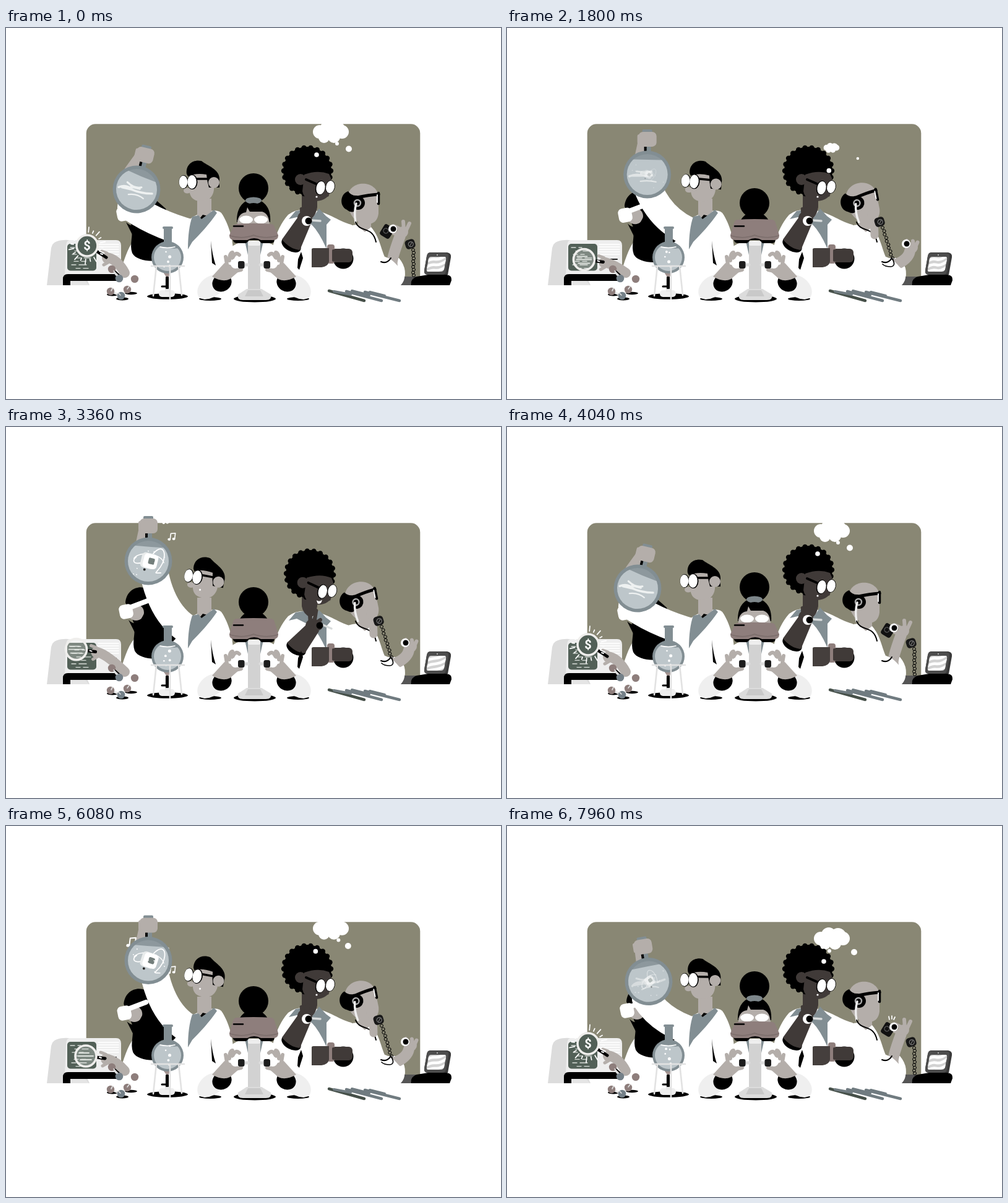
Recreate the animation shown at these times as an HTML page with a canvas. Size 800 px wide and 600 px high, loop 8 s.

```html
<!DOCTYPE html>
<html lang="en">
<head>
<meta charset="utf-8">
<title>Laboratory</title>
<style>
html, body { margin: 0; width: 100%; height: 100%; overflow: hidden; background: #fff; }
canvas { display: block; width: 800px; height: 600px; }
</style>
</head>
<body>
<canvas id="stage" width="800" height="600"></canvas>
<script>
const ctx = document.getElementById('stage').getContext('2d');
const LOOP = 8000, CYCLE = 4040, HALF = 2020, TAU = Math.PI * 2;
const WHITE = '#fff', BLACK = '#000', SKIN = '#b4aeaa', DARK = '#403a38',
  STEEL = '#828e93', PALE = '#bdc6ca', MAUVE = '#8e7e7c', WALL = '#898774', SCREEN = '#526057';

const mix = (a, b, u) => a + (b - a) * u;
const ease = u => u * u * (3 - 2 * u);

// Eased value between [time, value] stops.
function key(t, ...stops) {
  if (t <= stops[0][0]) return stops[0][1];
  for (let i = 1; i < stops.length; i++) {
    const [t0, a] = stops[i - 1], [t1, b] = stops[i];
    if (t <= t1) return mix(a, b, ease((t - t0) / (t1 - t0)));
  }
  return stops[stops.length - 1][1];
}

function shape(d, color) {
  ctx.fillStyle = color;
  ctx.fill(new Path2D(d));
}
function line(d, color, width) {
  ctx.strokeStyle = color;
  ctx.lineWidth = width;
  ctx.stroke(new Path2D(d));
}
function oval(x, y, rx, ry, color, turn = 0) {
  ctx.fillStyle = color;
  ctx.beginPath();
  ctx.ellipse(x, y, Math.max(rx, 0), Math.max(ry, 0), turn, 0, TAU);
  ctx.fill();
}
const dot = (x, y, r, color) => oval(x, y, r, r, color);
function ring(x, y, r, color, width) {
  ctx.strokeStyle = color;
  ctx.lineWidth = width;
  ctx.beginPath();
  ctx.arc(x, y, r, 0, TAU);
  ctx.stroke();
}
function box(x, y, w, h, r, color) {
  ctx.fillStyle = color;
  ctx.beginPath();
  ctx.roundRect(x, y, w, h, r);
  ctx.fill();
}
// Draw in a local frame whose origin is placed at x, y.
function at(x, y, turn, draw, sx = 1, sy = sx) {
  ctx.save();
  ctx.translate(x, y);
  ctx.rotate(turn);
  ctx.scale(sx, sy);
  draw();
  ctx.restore();
}
// Turn about a pivot while keeping stage coordinates.
function pose(px, py, turn, dx, dy, draw) {
  at(px + dx, py + dy, turn, () => { ctx.translate(-px, -py); draw(); });
}

function thought(p) {
  const q = p < 400 ? p + HALF : p;
  if (q < 1740 || q > 2320) return;
  const u = (q - 1900) / 120, grow = key(q, [1740, 0], [1870, 1]);
  ctx.save();
  ctx.beginPath();
  ctx.rect(130, 100, 539, 200);
  ctx.clip();
  at(524, 182 - 14 * u, 0, () => {
    for (const [x, y, r] of [[-17, 0, 11], [-4, -6, 12], [11, -4, 13], [19, 0, 11], [6, 8, 10], [-10, 9, 9]])
      dot(x, y, r, WHITE);
  }, grow);
  dot(561 - 7 * u, 204 - 8.5 * u, 5 * grow, WHITE);
  dot(521 + 14 * Math.min(u, 1.3), 202 - 15 * u, 3 * grow, WHITE);
  ctx.restore();
}
function thoughtSpark(p) {
  const q = p < 400 ? p + HALF : p;
  if (q < 1780 || q > 2160) return;
  const u = (q - 1900) / 120;
  dot(512 - 10 * u, 219 - 14 * u, 3.8, WHITE);
}

function seeker(t) {
  const dx = key(t, [0, -4], [1080, -4], [1900, -3], [2640, 0], [3920, 0], [4040, -4]);
  const dy = key(t, [0, 2], [1080, 6], [2040, 4], [2640, 0], [3920, 0], [4040, 2]);
  shape('M207 343 C196 356 190 378 183 400 L183 416 H300 V340Z', WHITE);
  pose(215, 320, 0, dx, dy, () => {
    shape('M193 284 C195 258 223 252 237 268 L262 290 280 335 256 373 C238 377 214 374 208 362 C203 348 210 334 207 318Z', BLACK);
    dot(210, 300, 13, SKIN);
    shape('M198 312 Q212 326 222 304 L230 290 240 330 210 336Z', BLACK);
    line('M200 292 L229 281', WHITE, 8);
    pose(194, 298, -.2, 0, 0, () => box(183, 287, 22, 23, 7, WHITE));
  });
}

function machine() {
  shape('M80 346 Q89 342 102 343 L135 416 H66 L73 356 Q75 348 80 346Z', '#dcdcdc');
  shape('M103 343 H178 Q186 343 186 352 V400 H95 L97 352 Q98 343 103 343Z', '#eeeeee');
  for (let y = 350; y < 370; y += 4) line(`M149 ${y} H182`, WHITE, 1.6);
  shape('M92 416 V406 Q92 398 100 398 H180 V409 H104 V416Z', BLACK);
  shape('M104 409 H128 L134 416 H104Z', '#e5e5e5');
  line('M160 374 H178', '#222', 2);
  ctx.save();
  ctx.beginPath();
  ctx.roundRect(99, 349, 47, 43.5, 5);
  ctx.clip();
  ctx.fillStyle = SCREEN;
  ctx.fillRect(99, 349, 47, 44);
  for (let i = 0; i < 7; i++) {
    const y = 355 + i * 5.6, x = 104 + (i * 7) % 11, w = 7 + (i * 13) % 13;
    line(`M${x} ${y} h${w} m5 0 h${5 + (i * 5) % 9}`, '#d7dcd8', 1.3);
  }
  ctx.restore();
}

function magnifier(t, d) {
  const x = key(t, [0, 131], [620, 131], [1080, 120], [1500, 118], [2040, 129], [2640, 106], [3200, 108], [3700, 131]);
  const y = key(t, [0, 352], [620, 352], [1080, 381], [1500, 378], [2040, 372], [2640, 357], [3200, 362], [3700, 352]);
  const found = key(t, [0, 1], [550, 1], [750, 0], [3500, 0], [3700, 1]);
  const hx = x + 36, hy = y + mix(20, 5, d);
  line(`M${hx} ${hy} Q${hx + 14} ${hy + 4} 192 396`, SKIN, 16);
  dot(hx - 3, hy, 9, SKIN);
  line(`M${hx - 4} ${hy - 8} l-8 -3 M${hx - 2} ${hy + 7} l-7 4`, SKIN, 5);
  line(`M${x + 17} ${y + mix(10, 2, d)} L${hx - 5} ${hy - 1}`, BLACK, 5);
  line(`M${x + 22} ${y + mix(13, 2, d)} l3 1`, WHITE, 2);
  line('M174 391 L186 402', BLACK, 2);
  if (found > 0) {
    ctx.globalAlpha = found;
    dot(x, y, 16, SCREEN);
    for (let i = 0; i < 20; i++) {
      const a = i / 20 * TAU + .1, c = Math.cos(a), s = Math.sin(a);
      const far = 26 + 4 * (i % 2) + Math.sin(t / 60) * 1.2;
      line(`M${x + c * 22} ${y + s * 22} L${x + c * far} ${y + s * far}`, WHITE, 1.7);
    }
    ctx.fillStyle = WHITE;
    ctx.font = 'bold 20px Roboto, "Liberation Sans", sans-serif';
    ctx.textAlign = 'center';
    ctx.textBaseline = 'middle';
    ctx.fillText('$', x, y + 1);
    ctx.globalAlpha = 1;
  } else {
    ctx.globalAlpha = .25;
    dot(x, y, 16, WHITE);
    ctx.globalAlpha = 1;
    line(`M${x - 11} ${y - 5} h16 M${x - 12} ${y} h24 M${x - 9} ${y + 6} h18`, '#dfe3df', 1.8);
  }
  ring(x, y, 17, '#efeeec', 3.6);
}

function note(x, y, s) {
  at(x, y, .12, () => {
    line('M-4 6 V-6 L5 -8 V4', WHITE, 2);
    oval(-6, 6, 3, 2.4, WHITE);
    oval(3, 4, 3, 2.4, WHITE);
  }, s);
}

function player() {
  line('M-20 -8 C-34 2 -12 10 6 -10 S30 -12 22 4 S2 20 18 20', WHITE, 1.7);
  line('M-24 -6 C-14 -18 20 -12 24 4', WHITE, 1.4);
  at(0, 0, .3, () => {
    box(-13, -13, 24, 25, 6, '#e9ecec');
    box(-9, -12, 23, 23, 5, WHITE);
    box(-1, -6, 10, 10, 2, '#737e7b');
  });
  dot(-8, 13, 2, '#222');
}

function bigFlask(t) {
  const time = t > 2000 ? t - CYCLE : t;
  const env = key(t, [0, 1], [600, 1], [1000, 0], [3600, 0], [3850, 1]);
  const wave = Math.cos(time / 320 * TAU) * env;
  const x = key(t, [0, 221.5], [1600, 222], [1960, 230], [3600, 230], [3900, 221.5]) - 10.5 * wave;
  const y = key(t, [0, 261], [1000, 264], [1600, 264], [1960, 217.5], [3640, 217], [4040, 261]);
  const tilt = .23 * wave;
  const lift = key(t, [1600, 0], [1960, 1], [3640, 1], [4040, 0]);
  const made = key(t, [1700, 0], [1980, 1], [3800, 1], [4030, 0]);

  line(`M320 338 Q${mix(250, 258, lift)} 322 ${x + mix(-8, 10, lift)} ${y + mix(29, 22, lift)}`, WHITE, 46);
  const hx = x + 58 * Math.sin(tilt), hy = y - 58 * Math.cos(tilt);
  line(`M${hx - 6} ${hy} L${x - 12} ${y - 30}`, SKIN, 16);

  if (made > .6 && t < 3640) {
    const rise = (t - 2040) * .042;
    if (rise < 60) note(204, 188 - rise, 1);
    note(259, 202 - rise * .9, .65);
    note(269, 233 - rise, .8);
  }

  at(x, y, tilt, () => {
    box(-5, -50, 11, 22, 1, STEEL);
    box(-5, -46, 4, 8, 0, BLACK);
    box(-8, -73, 16, 6, 2, STEEL);
    box(-14, -69, 29, 24, 7, SKIN);
    line('M-13 -62 v10', SKIN, 6);
    dot(0, 0, 38.5, STEEL);
    ctx.beginPath();
    ctx.arc(0, 0, 33, 0, TAU);
    ctx.clip();
    ctx.fillStyle = '#8d989d';
    ctx.fillRect(-40, -40, 80, 80);
    const lean = mix(7 * wave, 3, made);
    shape(`M-40 ${-24 - lean} Q0 ${-24 + lean * .4} 40 ${-24 + lean} V40 H-40Z`, PALE);
    ctx.globalAlpha = 1 - made;
    const sway = Math.sin(time / 110) * 2 * env, bend = 3 * env;
    line(`M${-17 + sway} ${-5 - bend} Q-4 ${-3 + bend} 7 -5 M-10 -2 H5`, '#eef1f1', 3);
    line(`M${-29 - sway} 3 Q-18 ${-2 - bend} -6 2 H-24 M-8 2 Q10 ${2 + bend} ${8 + 18 * env} 1`, '#eef1f1', 3.4);
    line(`M${-11 + sway} 11 Q2 ${9 - bend} 14 12`, '#eef1f1', 2.2);
    ctx.globalAlpha = made;
    if (made > 0) at(1, 0, Math.sin(time / 90) * .06 + wave, player, .3 + .7 * made);
    for (let i = 0; i < 7; i++) dot(Math.sin(i * 5.1) * 26, 24 - (t * .012 + i * 9) % 46, .9, WHITE);
    ctx.globalAlpha = 1;
  });
}

function chemistBody() {
  shape('M296 311 Q303 302 326 297 Q345 292 350 302 C362 322 367 346 367 360 V416 H240 V368 Q276 350 296 311Z', WHITE);
  shape('M309 276 H332 V297 L318 309 309 306Z', SKIN);
  shape('M309 313 L318 302 326 304 316 318Z', BLACK);
  shape('M301 305 L311 303 316 309 336 294 341 299 C328 318 313 334 301 346 L294 358 Q294 325 301 305Z', STEEL);
  shape('M331 344 Q333 366 339 384 L333 380Z', BLACK);
}
function chemistHead(t) {
  const turn = key(t, [0, 0], [700, 0], [1000, -.05], [1600, -.05], [1960, .19], [3600, .19], [3960, 0]);
  const dx = key(t, [0, 0], [700, 0], [1000, -6], [1600, -6], [1960, 5.5], [3600, 5.5], [3960, 0]);
  const dy = key(t, [0, 0], [700, 0], [1000, 6], [1600, 6], [1960, -2.5], [3600, -2.5], [3960, 0]);
  pose(320, 262, turn, dx, dy, () => {
    shape('M296 236 H336 V262 C334 276 324 281 313 280 C300 279 296 270 296 258Z', SKIN);
    oval(293, 263, 6, 4.5, SKIN);
    shape('M292 236 C290 221 302 212 316 215 C326 223 344 228 345 243 V258 H328 Q325 248 324 237 Q306 234 294 240Z', BLACK);
    dot(336, 250, 9, SKIN);
    line('M306 244 H327', BLACK, 3.5);
    oval(287, 249, 7.5, 11, BLACK);
    oval(301, 249, 8.5, 12, BLACK);
    oval(286.5, 249, 6.8, 10.3, WHITE);
    oval(300.5, 249, 7.3, 11, WHITE);
    if (turn > .1) dot(309, 268, 1.5, WHITE);
  });
}

function caller(t, d) {
  const dip = key(t, [850, 0], [1080, 7], [1350, 0]);
  shape('M550 322 Q570 314 590 322 C604 338 606 358 613 372 H635 Q652 392 640 416 H520 V318Z', WHITE);
  ctx.fillStyle = '#555';
  ctx.fillRect(638, 402, 31, 14);
  shape('M570 308 H590 V322 L580 330 568 320Z', SKIN);
  const hx = mix(641, 655, d), hy = mix(330, 355, d), reach = 1 - .5 * d;
  line(`M624 384 Q${mix(622, 648, d)} 376 ${hx - 4} ${hy + 6}`, SKIN, 18);
  shape('M583 376 Q612 358 634 386 Q652 400 638 416 H560Z', WHITE);
  line('M606 378 Q616 382 622 372', BLACK, 2);
  pose(574, 281, -.2 * d, -3 * d, dip * d - d, () => {
    shape('M552 274 C554 244 600 245 602 273 V300 Q600 317 584 317 Q564 317 556 298Z', SKIN);
    shape('M553 264 C540 268 538 288 551 294 Q558 300 564 296 L568 271 Q558 272 553 264Z', BLACK);
    line('M568 274 Q586 270 602 269', BLACK, 5);
    line('M602 267 V284', BLACK, 4.5);
    line('M600 270 V282', WHITE, 1.8);
    dot(569, 283, 11, BLACK);
    ring(568, 283, 5, '#aaa', 2.5);
    line('M566 284 Q562 298 565 314', '#eee', 3.5);
  });
  line(`M565 ${314 + dip * .5} C572 332 592 319 598 346`, BLACK, 2);

  const px = mix(653, 602, d), py = mix(349, 313, d);
  const ex = mix(658, 622, d), ey = mix(400, 372, d);
  for (let i = 0; i <= 9; i++) {
    const u = i / 9;
    ring(mix(px + 5, ex, u) + (i % 2), mix(py + 10, ey, u), 2.5, BLACK, 1);
  }
  if (d > .5) line(`M${ex} ${ey} Q630 385 620 386 Q611 386 607 382`, BLACK, 1.7);
  if (d > .3) {
    line(`M${px - 8} ${py + 22} L${px - 9} ${py - 8}`, SKIN, 13);
    dot(px - 11, py - 10, 9, SKIN);
  }
  at(px, py, -.3, () => {
    box(-8, -7, 16, 15, 5, '#181818');
    ring(1, 1, 4, '#777', 1.2);
    line('M-1 3 L3 -1', '#777', 1.2);
  });

  const ox = mix(625, 645, d), oy = mix(325, 349, d);
  const snap = 1 - key(d, [0, 0], [.6, 1]);
  if (snap > 0) at(614, 328, .55, () => {
    box(-7, -10, 18, 20, 4, '#111');
    ring(0, 0, 4, '#555', 1.4);
  }, snap);
  dot(hx, hy, 9, SKIN);
  line(`M${hx - 4} ${hy - 5} L${ox + 1} ${oy - 5} M${hx - 6} ${hy + 4} L${ox + 2} ${oy + 7}`, SKIN, 6);
  line(`M${hx + 2} ${hy - 4} l-1 ${-13 * reach} M${hx + 6} ${hy - 3} l${5 * reach} ${-11 * reach}`, SKIN, 6);
  dot(ox, oy, 7, WHITE);
  dot(ox + 1, oy, 4.5, BLACK);
  if (t > 3840 && t < 4000) line('M617 308 l1 5 M622 307 v5 M627 309 l-2 4', WHITE, 1.7);
}

function artist(p) {
  const nod = key(p, [250, 0], [1000, 1], [1350, 1], [1740, 0]);
  const q = key(p, [150, 0], [500, 1], [1400, 1], [1740, 0]);
  at(0, 4 * nod, 0, () => {
    shape('M456 302 Q468 292 490 294 C520 296 535 312 558 318 L592 345 V416 H432 V350 Q440 320 456 302Z', WHITE);
    shape('M457 309 L468 296 486 293 497 305 506 292 517 304 525 310 518 318 518 357 Q506 330 494 318 L470 306Z', STEEL);
  });
  shape('M478 268 H503 V290 Q500 306 492 308 Q480 302 478 290Z', DARK);
  pose(487, 250, .03 * nod, 3.5 * nod, 7 * nod, () => {
    for (let i = 0; i < 22; i++) {
      const a = i / 22 * TAU;
      dot(487 + Math.cos(a) * 38, 231 + Math.sin(a) * 37.5, 4.2, BLACK);
    }
    dot(487, 231, 39, BLACK);
    shape('M482 237 Q504 229 522 236 Q529 248 525 262 Q521 279 501 280 Q482 279 479 264Z', DARK);
    dot(476, 245, 9, DARK);
    line('M485 245 L501 252', BLACK, 4);
    oval(508, 258.5, 8, 11.7, BLACK, .2);
    oval(524, 257, 7.6, 10.8, BLACK, .2);
    oval(508.5, 258.5, 7, 10.7, WHITE, .2);
    oval(524, 257, 6.8, 10, WHITE, .2);
    dot(519, 270, 3, DARK);
    if (nod > .3) shape('M499 273 Q504 276 508 272 Q507 280 501 278Z', WHITE);
    else dot(502, 273, 1.6, WHITE);
  });

  const hx = mix(483, 496, q), hy = mix(305, 319, q);
  const bx = mix(461, 469, q), by = mix(350, 357, q);
  oval(bx, by + 1, 17, 10, BLACK, .5);
  shape(`M${bx - 15} ${by - 8} L${hx - 12} ${hy + 2} L${hx + 10} ${hy + 11} L${bx + 14} ${by + 9} Q${bx - 2} ${by + 8} ${bx - 15} ${by - 8}Z`, DARK);
  dot(hx, hy + 3, 12, DARK);
  line(`M${hx - 4} ${hy} l-1 ${mix(-12, -23, q)} M${hx + 2} ${hy - 2} l3 ${mix(-12, -20, q)}`, DARK, 6.5);
  line(`M${hx + 6} ${hy - 3} l6 -4`, DARK, 6);
  const tx = mix(486, 504, q), ty = mix(312, 321, q);
  line(`M${tx + 8} ${ty - 1} L${tx + 22} ${ty + mix(0, 5, q)}`, '#d9dcdc', 3.5);
  dot(tx, ty, 8, q > .5 ? DARK : WHITE);
  dot(tx + 3, ty, 5.5, BLACK);
  if (p > 780 && p < 1340) {
    const fall = Math.max(0, p - 1080) * .09, s = key(p, [780, 0], [1050, 1]);
    at(524, 327 + fall, 0, () => shape('M0 -5 Q6 4 0 4 Q-6 4 0 -5Z', STEEL), s);
  }
  shape('M472 374 L477 362 480 372 474 391 471 388Z', BLACK);
  dot(545, 373, 16.5, BLACK);
  box(518, 357, 42, 22, 6, DARK);
  box(519, 350, 12, 31, 4, MAUVE);
  box(527, 358, 12, 20, 2, DARK);
  shape('M494 358 Q494 356 497 356 H522 V378 Q520 386 510 387 H494Z', '#453f3d');
}

function mirrored(draw) {
  draw();
  at(802, 0, 0, draw, -1, 1);
}
function viewer(d) {
  shape('M356 416 V365 Q366 344 400 344 Q436 344 444 365 V416Z', WHITE);
  shape('M386 345 L393 345 391 367Z M409 345 L416 345 411 367Z', STEEL);
  const drop = 24 * d;
  dot(400, 259 + drop, 24, BLACK);
  at(0, drop * .85, 0, () => {
    shape('M373 314 C372 288 386 277 400 277 S429 288 427 314Z', BLACK);
    ctx.globalAlpha = 1 - d;
    oval(400, 279, 13, 5.5, '#7d868a');
    ctx.globalAlpha = 1;
    shape('M377 316 C377 294 388 283 400 283 S424 294 423 316Z', BLACK);
    shape('M374 312 Q377 299 388 298 L390 290 394 297 H414 Q425 300 426 318 H374Z', SKIN);
    oval(388, 310, 11, 6.5, WHITE);
    oval(412, 310, 11, 6.5, WHITE);
  });
  const top = mix(319, 312, d);
  shape('M366 338 H434 Q435 348 428 348 H413 L408 343 H393 L388 348 H372 Q366 347 366 338Z', BLACK);
  shape(`M372 ${top - 2} Q400 ${top - 4} 429 ${top - 2} Q433 ${top - 1} 434 ${top + 3} L440 335 Q440 343 432 343 H412 Q401 337 390 343 H369 Q361 343 361 335 L367 ${top + 3} Q368 ${top - 1} 372 ${top - 2}Z`, MAUVE);
  line('M362 336 Q382 342 400 335 Q420 342 439 336', '#7b6d6b', 1.4);
  line('M368 320.5 H383', BLACK, 2.4);

  oval(402, 438, 34, 5.5, BLACK);
  box(391, 345, 20, 82, 2, '#d2d2d2');
  box(391, 345, 20, 7, 2, '#eee');
  shape('M389 422 H413 L428 431 Q430 440 420 440 H383 Q373 440 375 431Z', '#dcdcdc');
  shape('M391 424 H411 L416 434 H386Z', '#c9c9c9');
  line('M383 383 H391 M411 383 H418', '#ddd', 5);
  mirrored(() => {
    oval(330, 438, 18, 3, BLACK);
    shape('M313 437 C302 424 316 400 342 398 Q352 405 350 424 Q338 438 321 439Z', '#efefef');
    oval(349, 412, 16, 14, BLACK, -.5);
    shape('M333 402 L353 380 372 386 378 392 362 406 Q350 412 333 402Z', SKIN);
    line('M357 382 L355 370 M361 376 Q361 364 366 363 M366 372 Q371 361 377 367', SKIN, 6);
    line('M366 394 L380 391', SKIN, 6);
    dot(371, 381, 8, WHITE);
    box(375, 377, 10.5, 12, 3, '#1d1d1d');
  });
}

function burner(t) {
  oval(261, 434, 33, 4.8, BLACK);
  box(247, 424, 26, 11, 5, '#eee');
  box(257, 405, 8, 22, 1, '#e8e8e8');
  const flick = Math.sin(t / 70) * 1.5;
  shape(`M252 390 Q${260 + flick} 386 268 390 Q266 398 261 ${405 + flick} Q255 398 252 390Z`, '#a39390');
  box(258, 402, 5, 20, 1, BLACK);
  line('M252 418 H258', BLACK, 3);
  box(255, 323, 13, 34, 1, STEEL);
  box(253, 321, 17, 4, 2, STEEL);
  dot(261, 371, 26, STEEL);
  ctx.save();
  ctx.beginPath();
  ctx.arc(261, 371, 22, 0, TAU);
  ctx.clip();
  shape('M238 355 Q250 352 261 355 T284 355 V395 H238Z', PALE);
  line('M249 354 Q260 357 273 354', WHITE, 1.6);
  for (let i = 0; i < 5; i++) {
    const y = 386 - (t * .03 + i * 8) % 31;
    dot(260 + Math.sin(i * 2.4 + y / 9) * 5, y, 1.3 + i % 3 * .6, WHITE);
  }
  ctx.restore();
  line('M235 385 H288 M243 385 L238 433 M279 385 L284 432 M265 385 V438', '#e2e2e2', 2.6);
}

function molecules() {
  oval(172, 431, 9, 2.4, BLACK);
  oval(202, 429, 10, 2.2, BLACK);
  oval(188, 438, 10, 2.4, BLACK);
  line('M171 390 L183 405 M169 426 L186 433 L196 423', '#e6e6e6', 3);
  for (const [x, y] of [[171, 390], [208, 406], [169, 426], [196, 423]]) dot(x, y, 6.2, MAUVE);
  for (const [x, y] of [[183, 405], [186, 433]]) dot(x, y, 6.3, '#748088');
  line('M174 393 l6 7 M172 421 l-2 4 M199 418 l-3 4 M182 429 l3 3', '#ddd', 1.7);
}

function laptop(t) {
  shape('M655 416 Q653 406 664 402 L682 399 H712 Q721 400 720 408 L717 416Z', BLACK);
  shape('M685 363 H713 Q720 364 719 371 L714 399 H681 Q675 398 676 392 L680 369 Q681 363 685 363Z', '#3a3a3a');
  shape('M685 364 H711 Q716 365 715 371 L711 394 Q710 399 705 399 H681 Q675 398 676 392 L680 369 Q681 364 685 364Z', '#4d4d4d');
  ctx.save();
  ctx.clip(new Path2D('M687 370 H708 Q712 370 711 374 L708 390 Q707 394 703 394 H682 Q679 393 680 390 L683 373 Q684 370 687 370Z'));
  ctx.fillStyle = '#d2d2d2';
  ctx.fillRect(676, 368, 40, 30);
  const sway = Math.sin(t / CYCLE * TAU * 4) * 1.5;
  for (const y of [374, 383, 392])
    line(`M677 ${y + 5} Q686 ${y - 1 + sway} 694 ${y} T714 ${y - 8}`, WHITE, 4.5);
  ctx.restore();
  dot(697, 367, 1, '#ccc');
}

function pens() {
  line('M522 425 L579 441', '#465049', 4.5);
  line('M550 426 L607 441 M580 427 L636 441', '#707b80', 4.5);
  line('M530 426 L557 431 M559 425 L587 432 M588 427 L612 433', '#707b80', 4);
}

function draw(now) {
  const t = Math.floor(now % LOOP / 40) * 40 % CYCLE, p = t % HALF;
  const d = key(t, [800, 0], [1200, 1], [3450, 1], [3820, 0]);
  ctx.fillStyle = WHITE;
  ctx.fillRect(0, 0, 800, 600);
  ctx.lineCap = ctx.lineJoin = 'round';
  box(129.7, 155.3, 539.6, 248, [15, 15, 0, 0], WALL);
  thought(p);
  seeker(t);
  machine();
  magnifier(t, d);
  caller(t, d);
  artist(p);
  thoughtSpark(p);
  bigFlask(t);
  chemistBody();
  chemistHead(t);
  viewer(d);
  burner(t);
  molecules();
  laptop(t);
  pens();
}

function frame() {
  draw(performance.now());
  requestAnimationFrame(frame);
}
frame();
</script>
</body>
</html>
```
